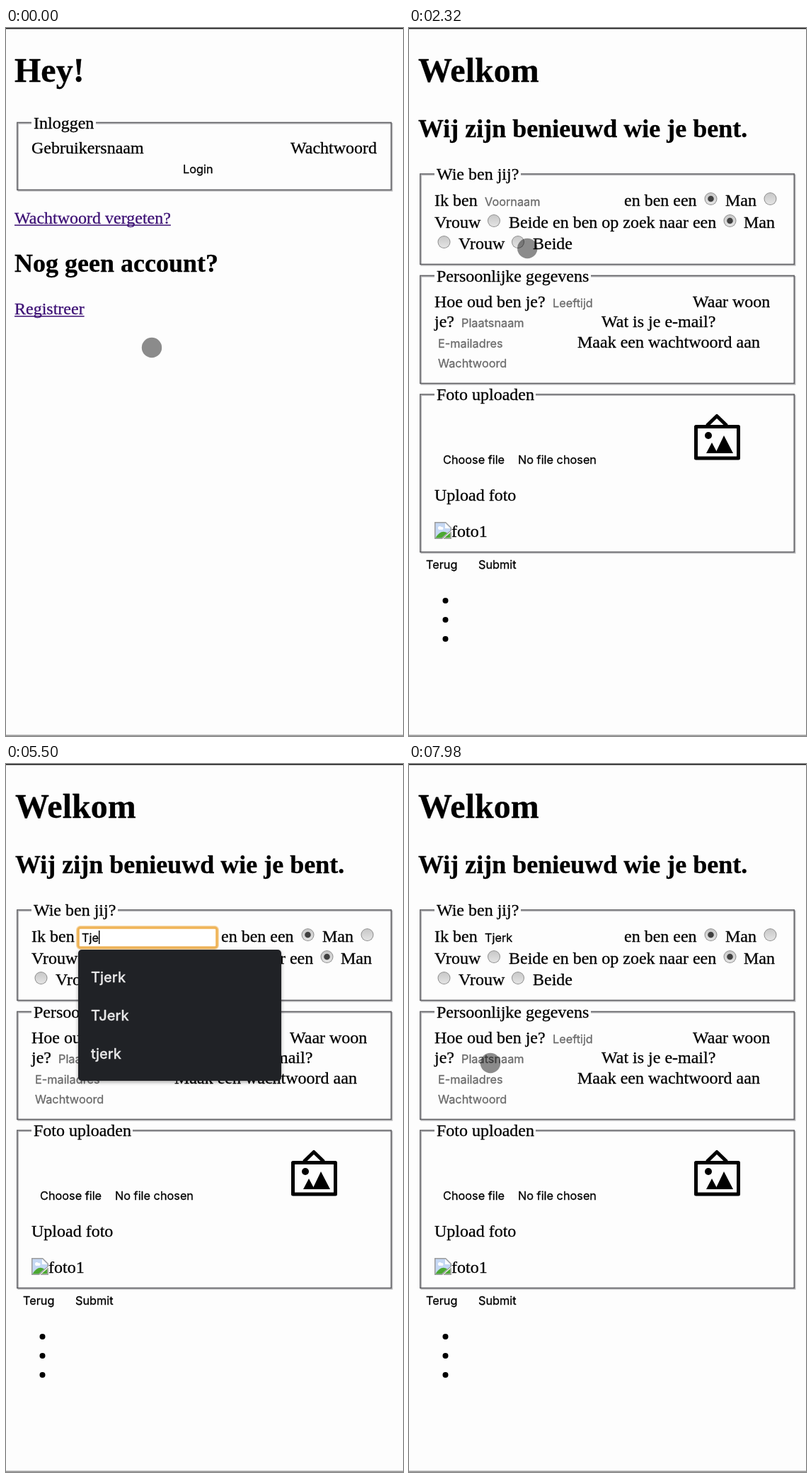
Write an HTML page with a canvas that moves like this. It is 561 px wide and 999 px high and loops after 8000 ms.

```html
<!DOCTYPE html>
<html lang="nl">
<head>
<meta charset="utf-8">
<title>Registreren</title>
<style>
html, body { margin: 0; width: 100%; height: 100%; overflow: hidden; background: #fdfdfd; }
canvas { display: block; }
</style>
</head>
<body>
<canvas id="stage" width="561" height="999"></canvas>
<script>
const ctx = document.getElementById('stage').getContext('2d');
const LOOP = 8000;
const PAGE_AT = 1850, FOCUS_AT = 2750, BLUR_AT = 7250;
const HIDE_AT = 3700, SHOW_AT = 6650;
const SERIF = '"Liberation Serif", "Times New Roman", serif';
const SANS = 'Inter, Roboto, sans-serif';
const BODY = '24px ' + SERIF, H1 = 'bold 48px ' + SERIF, H2 = 'bold 36px ' + SERIF;
const UI = '16.3px ' + SANS, MENU = '500 20px ' + SANS;
const HINT = '#6a6a6a';

const NAMES = ['aa', 'Teun', 'Koen', 'ooo', 'sdg', 'Bas', 'Tjerk', 'TJerk', 'tjerk'];
const KEYS = [
  [FOCUS_AT, ''], [3700, 'T'], [4200, 'TJ'], [5000, 'T'],
  [5300, 'Tj'], [5500, 'Tje'], [5800, 'Tjer'], [6100, 'Tjerk']
];
// Pointer stops: time, x, y
const PATH = [
  [0, 206, 451], [350, 206, 451], [1200, 80, 400], [2000, 80, 400],
  [2600, 238, 239], [SHOW_AT, 238, 239], [6960, 89, 353],
  [7400, 89, 353], [7900, 115, 422], [LOOP, 115, 422]
];

// A hairline stroke gives the slightly heavier look of smoothed screen type.
function text(str, x, y, font = BODY, color = '#000') {
  ctx.font = font;
  ctx.fillStyle = ctx.strokeStyle = color;
  ctx.lineWidth = 0.3;
  ctx.lineJoin = 'round';
  ctx.fillText(str, x, y);
  ctx.strokeText(str, x, y);
  ctx.lineJoin = 'miter';
}

function disc(x, y, r, color) {
  ctx.fillStyle = color;
  ctx.beginPath();
  ctx.arc(x, y, r, 0, Math.PI * 2);
  ctx.fill();
}

function poly(color, ...pts) {
  ctx.fillStyle = color;
  ctx.beginPath();
  for (let i = 0; i < pts.length; i += 2) ctx.lineTo(pts[i], pts[i + 1]);
  ctx.closePath();
  ctx.fill();
}

function rounded(x, y, w, h, r) {
  ctx.beginPath();
  ctx.roundRect(x, y, w, h, r);
}

function fieldset(legend, y, bottom, gapEnd) {
  ctx.lineWidth = 1.5;
  ctx.strokeStyle = '#b4b4b6';
  ctx.strokeRect(17.2, y + 0.8, 528.5, bottom - y - 2);
  ctx.strokeStyle = '#606064';
  ctx.strokeRect(15.8, y - 0.6, 528.5, bottom - y - 2);
  ctx.fillStyle = '#fdfdfd';
  ctx.fillRect(36, y - 3, gapEnd - 36, 7);
  text(legend, 39, y + 7.5);
}

function link(str, baseline, color) {
  text(str, 12, baseline, BODY, color);
  ctx.fillRect(12, baseline + 2, ctx.measureText(str).width, 1.5);
}

function radio(x, y, checked) {
  const fill = ctx.createLinearGradient(0, y - 9, 0, y + 9);
  fill.addColorStop(0, '#c6c6c6');
  fill.addColorStop(1, '#e6e6e6');
  disc(x, y, 9, '#8e8e8e');
  disc(x, y, 8, fill);
  if (checked) disc(x, y, 4.3, '#404040');
}

function photoIcon() {
  ctx.strokeStyle = '#000';
  ctx.lineWidth = 5;
  ctx.lineJoin = 'round';
  ctx.strokeRect(405.5, 562.5, 60, 44.5);
  ctx.beginPath();
  ctx.moveTo(421, 561);
  ctx.lineTo(435, 547.5);
  ctx.lineTo(449, 561);
  ctx.stroke();
  ctx.lineJoin = 'miter';
  disc(423, 575, 5, '#000');
  poly('#000', 420, 600, 428, 585, 436, 600);
  poly('#000', 433, 600, 445, 575, 458, 600);
}

function brokenImage() {
  ctx.save();
  ctx.translate(36, 697);
  poly('#9b9b9b', 0, 0, 16, 0, 24, 8, 24, 12, 11, 24, 0, 24);
  poly('#c5d8f4', 1.5, 1.5, 15.5, 1.5, 22.5, 8.5, 22.5, 12, 10, 22.5, 1.5, 22.5);
  poly('#fff', 15, 1.5, 22.5, 9, 15, 9);
  disc(7.5, 8.5, 2.5, '#fff');
  disc(10.5, 9, 2, '#fff');
  ctx.fillStyle = '#4ca832';
  ctx.beginPath();
  ctx.moveTo(1.5, 22.5);
  ctx.quadraticCurveTo(9, 10, 18, 15.5);
  ctx.lineTo(10, 22.5);
  ctx.fill();
  poly('#4ca832', 14, 22.5, 22.5, 15, 22.5, 22.5);
  ctx.strokeStyle = '#9b9b9b';
  ctx.lineWidth = 1.5;
  ctx.beginPath();
  ctx.moveTo(13, 23.2);
  ctx.lineTo(23.2, 23.2);
  ctx.lineTo(23.2, 14);
  ctx.stroke();
  ctx.restore();
}

function loginPage(pointer) {
  text('Hey!', 12, 76, H1);
  fieldset('Inloggen', 134, 231, 127);
  text('Gebruikersnaam', 36, 176.5);
  text('Wachtwoord', 402, 176.5);
  text('Login', 250, 205, UI);
  link('Wachtwoord vergeten?', 275.5, '#3d1175');
  text('Nog geen account?', 12, 344, H2);

  const hover = pointer.x < 111 && pointer.y > 383 && pointer.y < 410;
  if (hover) {
    ctx.fillStyle = '#8fcfe3';
    rounded(12, 383, 99, 27, 4);
    ctx.fill();
  }
  link('Registreer', 404, hover ? '#8a2f50' : '#3d1175');
}

function formPage(value) {
  text('Welkom', 13, 76, H1);
  text('Wij zijn benieuwd wie je bent.', 13, 154, H2);

  fieldset('Wie ben jij?', 206.5, 336, 158);
  text('Ik ben', 36, 251.3);
  text(value || 'Voornaam', 107, 251, UI, value ? '#000' : HINT);
  text('en ben een', 304, 251.3);
  radio(426.5, 241, true);
  text('Man', 447, 251.3);
  radio(510.5, 241);
  text('Vrouw', 36, 282.3);
  radio(120, 272);
  text('Beide en ben op zoek naar een', 141, 282.3);
  radio(453.5, 272, true);
  text('Man', 473, 282.3);
  radio(49.5, 302);
  text('Vrouw', 70, 312.3);
  radio(154, 302);
  text('Beide', 175, 312.3);

  fieldset('Persoonlijke gegevens', 350, 504, 257);
  text('Hoe oud ben je?', 36, 393.5);
  text('Leeftijd', 203, 393.5, UI, HINT);
  text('Waar woon', 401, 393.5);
  text('je?', 36, 422);
  text('Plaatsnaam', 74, 422, UI, HINT);
  text('Wat is je e-mail?', 272, 422);
  text('E-mailadres', 41, 450.5, UI, HINT);
  text('Maak een wachtwoord aan', 238, 450.5);
  text('Wachtwoord', 41, 479, UI, HINT);

  fieldset('Foto uploaden', 517.5, 742, 179);
  text('Choose file', 48, 615, UI);
  text('No file chosen', 154, 615, UI);
  photoIcon();
  text('Upload foto', 36, 667);
  brokenImage();
  text('foto1', 60, 718);
  text('Terug', 24, 763, UI);
  text('Submit', 98, 763, UI);
  for (let i = 0; i < 3; i++) disc(51.5, 808 + 27 * i, 4, '#000');
}

function focusedField(value, sinceKey) {
  ctx.strokeStyle = 'rgba(240,180,85,.45)';
  ctx.lineWidth = 6;
  rounded(102, 231, 196, 28, 3);
  ctx.stroke();
  ctx.fillStyle = '#fff';
  ctx.fill();
  ctx.strokeStyle = '#efb458';
  ctx.lineWidth = 3.5;
  ctx.stroke();
  text(value || 'Voornaam', 107, 251, UI, value ? '#000' : HINT);
  if (sinceKey % 1000 < 500) {
    const caret = value ? 107 + ctx.measureText(value).width : 106;
    ctx.fillStyle = '#000';
    ctx.fillRect(caret, 235, 1.5, 19);
  }
}

function suggestions(value) {
  const start = value.toLowerCase();
  const rows = NAMES.filter(n => n.toLowerCase().startsWith(start)).slice(0, 6);
  ctx.save();
  ctx.shadowColor = 'rgba(0,0,0,.35)';
  ctx.shadowBlur = 5;
  ctx.shadowOffsetY = 2;
  ctx.fillStyle = '#202226';
  rounded(102, 262, 287, 23 + 54 * rows.length, 5);
  ctx.fill();
  ctx.restore();
  rows.forEach((name, i) => text(name, 120, 308 + 54 * i, MENU, '#e9e9ea'));
}

function pointerAt(t) {
  const i = PATH.findIndex(p => p[0] > t);
  const [t0, x0, y0] = PATH[i - 1], [t1, x1, y1] = PATH[i];
  const u = (t - t0) / (t1 - t0);
  const k = u * u * (3 - 2 * u);
  return { x: x0 + (x1 - x0) * k, y: y0 + (y1 - y0) * k };
}

function draw(now) {
  const t = now % LOOP;
  const pointer = pointerAt(t);
  ctx.fillStyle = '#fdfdfd';
  ctx.fillRect(0, 0, 561, 999);

  if (t < PAGE_AT) {
    loginPage(pointer);
  } else {
    const [keyAt, value] = KEYS.filter(k => k[0] <= t).pop() || [0, ''];
    formPage(value);
    if (t >= FOCUS_AT && t < BLUR_AT) {
      focusedField(value, t - keyAt);
      suggestions(value);
    }
  }

  if (t < HIDE_AT || t >= SHOW_AT) disc(pointer.x, pointer.y, 14.2, 'rgba(0,0,0,.45)');
  ctx.fillStyle = '#161616';
  ctx.fillRect(0, 0, 561, 1.4);
  ctx.fillStyle = '#777';
  ctx.fillRect(0, 997.5, 561, 1.2);
  requestAnimationFrame(draw);
}
requestAnimationFrame(draw);
</script>
</body>
</html>
```
